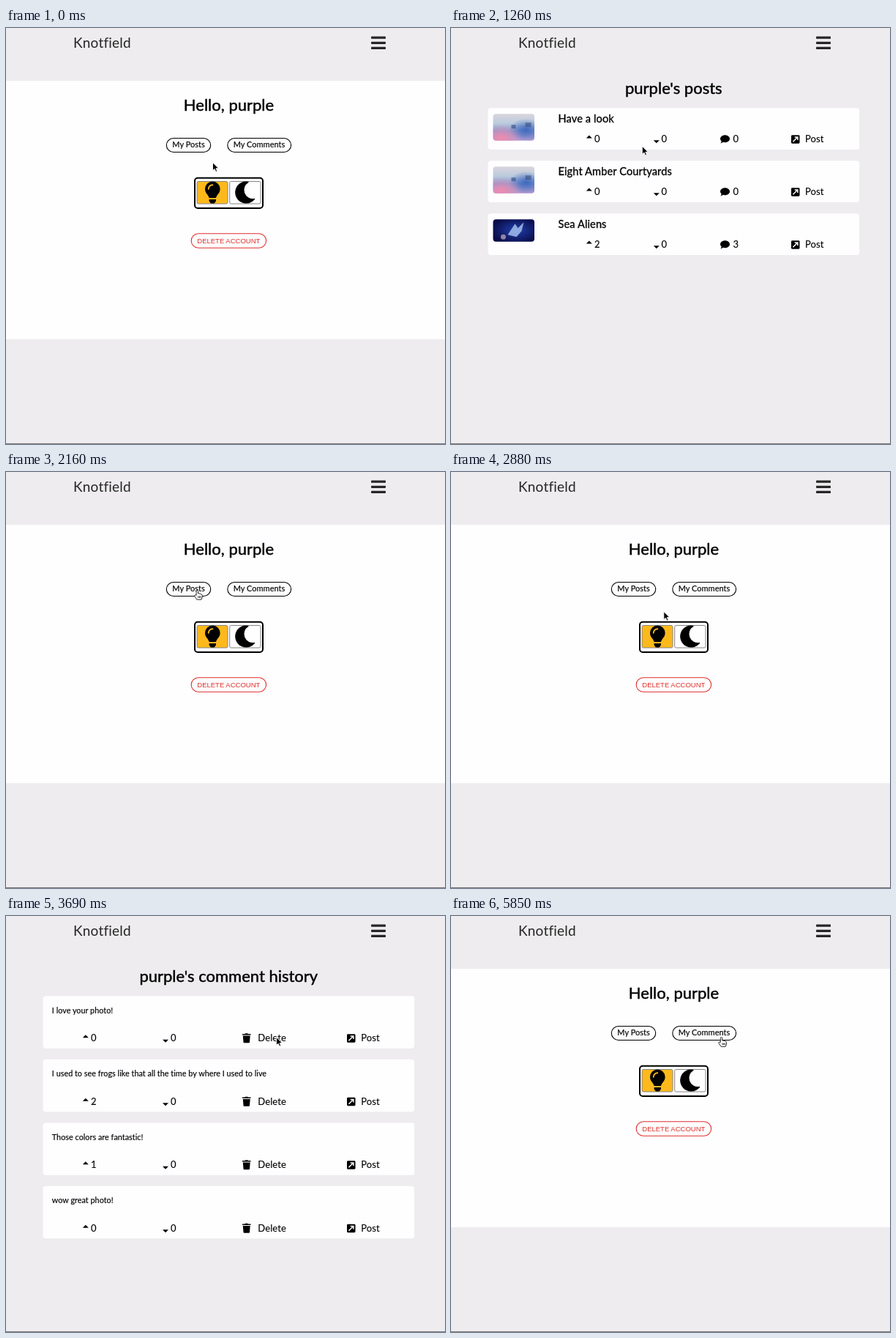
Animation, 600 px wide and 568 px high, one loop 5.94 s. Source, as an HTML page:

```html
<!DOCTYPE html>
<html lang="en">
<head>
<meta charset="utf-8">
<title>Account pages</title>
<style>
  html, body { margin: 0; width: 100%; height: 100%; overflow: hidden; background: #eeecee; }
  svg { display: block; width: 600px; height: 568px; }
  text { font-family: Lato, "Open Sans", sans-serif; white-space: pre; }
  .logo { font-size: 19px; letter-spacing: .2px; fill: #262626; }
  .title { font-size: 22px; text-anchor: middle; stroke: #000; stroke-width: .45px; }
  .button { font-size: 11px; text-anchor: middle; stroke: #000; stroke-width: .15px; }
  .danger { font: 9.5px "Liberation Sans", Arial, sans-serif; text-anchor: middle; fill: #e0302c; }
  .head { font-size: 14.6px; letter-spacing: .1px; stroke: #000; stroke-width: .3px; }
  .note { font-size: 10.8px; letter-spacing: .03px; stroke: #000; stroke-width: .15px; }
  .stat { font-size: 13px; letter-spacing: .1px; stroke: #000; stroke-width: .1px; }
  .card { fill: #fefdff; }
</style>
</head>
<body>
<svg viewBox="0 0 600 568">
  <defs>
    <linearGradient id="mist" x2="0" y2="1">
      <stop offset="0" stop-color="#d9d5dc"/><stop offset=".35" stop-color="#bccbdd"/>
      <stop offset=".65" stop-color="#8598cf"/><stop offset="1" stop-color="#b59bd0"/>
    </linearGradient>
    <radialGradient id="pink" cx=".2" cy=".9" r=".5">
      <stop offset="0" stop-color="#f08aae"/><stop offset="1" stop-color="#f08aae" stop-opacity="0"/>
    </radialGradient>
    <radialGradient id="blue" cx=".8" cy=".6" r=".42">
      <stop offset="0" stop-color="#3e68bd"/><stop offset="1" stop-color="#3e68bd" stop-opacity="0"/>
    </radialGradient>
    <radialGradient id="deep" cx=".55" cy=".5" r=".6">
      <stop offset="0" stop-color="#203fae"/><stop offset="1" stop-color="#0a0c48"/>
    </radialGradient>
    <path id="up" d="M0 4 4 0 8 4Z"/>
    <path id="down" d="M0 0H8L4 4Z"/>
    <path id="bubble" d="M6.5 0C10 0 13 2.2 13 5S10 10 6.5 10Q5 10 3.8 9.6 2.5 11 .3 11.2 1.4 10 1.6 8.2 0 7 0 5C0 2.2 3 0 6.5 0Z"/>
    <g id="open">
      <rect width="11.5" height="11.5" rx="1.4"/>
      <path d="M2.4 9.1 7.7 3.8M4.7 2.7H8.8V6.8" fill="none" stroke="#fefdff" stroke-width="1.5"/>
    </g>
    <path id="trash" d="M0 .9H3.5L4.2 0H7.3L8 .9H11.5V2.4H0ZM.8 3.3H10.7L10 12Q9.9 13 9 13H2.5Q1.6 13 1.5 12Z"/>
    <g id="mistPhoto">
      <rect width="56.5" height="36.5" rx="4" fill="url(#mist)"/>
      <rect width="56.5" height="36.5" rx="4" fill="url(#blue)"/>
      <rect width="56.5" height="36.5" rx="4" fill="url(#pink)"/>
      <path d="M25 15h6v5h-6ZM44 12h8v6h-8Z" fill="#3b5384" opacity=".65"/>
    </g>
    <g id="seaPhoto">
      <rect width="56.5" height="30.5" rx="4" fill="url(#deep)"/>
      <path d="M20 21 30 6 34 12 42 4 39 16 32 24Z" fill="#a3bdec" opacity=".85"/>
      <circle cx="14" cy="24" r="3.5" fill="#8d86a8"/>
    </g>
    <rect id="bar" x="499" width="20" height="3.2" rx=".8" fill="#262626"/>
  </defs>

  <g id="profile">
    <rect class="card" y="72" width="600" height="353"/>
    <text class="title" x="304.5" y="113">Hello, purple</text>
    <g fill="none" stroke="#000" stroke-width="1.1">
      <rect x="219.3" y="150.5" width="60.4" height="19" rx="9.5"/>
      <rect x="302.8" y="150.5" width="86.8" height="19" rx="9.5"/>
      <rect x="253.2" y="280.8" width="102.4" height="19.5" rx="9.75" stroke="#e0302c"/>
      <rect x="258" y="204.7" width="93" height="41.3" rx="4" stroke-width="2"/>
    </g>
    <text class="button" x="249.5" y="163.3">My Posts</text>
    <text class="button" x="346" y="163.3">My Comments</text>
    <text class="danger" x="304.3" y="294.2">DELETE ACCOUNT</text>
    <g stroke="#858585">
      <rect x="261" y="209.5" width="42" height="30.5" rx="2" fill="#fdb91c"/>
      <rect x="305.7" y="209.5" width="42.3" height="30.5" rx="2" fill="#fefdff"/>
    </g>
    <g transform="translate(272 209.5)">
      <path d="M0 10.3A10.3 10.3 0 0 1 20.6 10.3C20.6 16.5 16.3 17.5 15 22.5H5.6C4.3 17.5 0 16.5 0 10.3ZM5.6 24.4H15V26.8L13.5 29.1Q13 30 12 30H8.6Q7.6 30 7.1 29.1L5.6 26.8Z"/>
      <path d="M4.7 10.3A5.6 5.6 0 0 1 10.3 4.7" fill="none" stroke="#fdb91c" stroke-width="1.9" stroke-linecap="round"/>
    </g>
    <path d="M328.4 239.5A15 15 0 1 1 331.1 209.8Q332 210.3 331.3 211A11.8 11.8 0 0 0 339.4 232.8Q340.7 233 340 234A15 15 0 0 1 328.4 239.5Z"/>
  </g>

  <g id="posts"><text class="title" x="304.3" y="90">purple's posts</text><g id="postList"></g></g>
  <g id="comments"><text class="title" x="304.3" y="90">purple's comment history</text><g id="commentList"></g></g>

  <text class="logo" x="92" y="26.5">Knotfield</text>
  <use href="#bar" y="11.6"/><use href="#bar" y="18.7"/><use href="#bar" y="25.8"/>
  <path d="M0 567.5H600" stroke="#77767a"/>

  <g id="cursor">
    <path id="arrow" d="M0 0V11L2.6 8.7 4.3 12.6 6.2 11.8 4.5 8H8Z" stroke="#fff" stroke-width=".9"/>
    <path id="hand" d="M-1.2 7V1.2Q-1.2 0 0 0T1.2 1.2V4.5Q2.8 3.8 3.4 5 4.9 4.5 5.3 5.7 7 5.5 7 7V9.5L5.7 12.8H-.3L-3.6 8.2Q-4 6.6-2.6 6.5ZM1.5 8v2.5M3.2 8v2.5M4.9 8v2.5" fill="#fff" stroke="#111" stroke-width=".9" stroke-linejoin="round"/>
  </g>
</svg>
<script>
const LOOP = 5940, STEP = 90;
const $ = id => document.getElementById(id);
const show = (id, on) => $(id).style.display = on ? '' : 'none';
const icon = (id, x, y) => `<use href="#${id}" x="${x}" y="${y}"/>`;
const label = (cls, x, y, s) => `<text class="${cls}" x="${x}" y="${y}">${s}</text>`;
const card = (y, h) => `<rect class="card" x="50.5" y="${y}" width="507.7" height="${h}" rx="4"/>`;

$('postList').innerHTML = [
  ['Have a look', 0, 0, 'mistPhoto'],
  ['Eight Amber Courtyards', 0, 0, 'mistPhoto'],
  ['Sea Aliens', 2, 3, 'seaPhoto']
].map(([name, ups, replies, photo], i) => {
  const y = 109.2 + i * 72, base = y + 46.5;
  return card(y, 56.7) + label('head', 146.5, y + 20, name) +
    `<g class="photo">${icon(photo, 57.5, y + 8)}</g>` +
    icon('up', 184.8, y + 37.3) + label('stat', 196, base, ups) +
    icon('down', 276.8, y + 44) + label('stat', 287.5, base, 0) +
    icon('bubble', 368, y + 37) + label('stat', 385.5, base, replies) +
    icon('open', 465, y + 37) + label('stat', 484, base, 'Post');
}).join('');

$('commentList').innerHTML = [
  ['I love your photo!', 0],
  ['I used to see frogs like that all the time by where I used to live', 2],
  ['Those colors are fantastic!', 1],
  ['wow great photo!', 0]
].map(([note, ups], i) => {
  const y = 109.2 + i * 86.5, base = y + 62;
  return card(y, 71.5) + label('note', 62.8, y + 23.3, note) +
    icon('up', 104.8, y + 53) + label('stat', 116, base, ups) +
    icon('down', 214, y + 59.5) + label('stat', 225, base, 0) +
    icon('trash', 323, y + 51) + label('stat', 344.3, base, 'Delete') +
    icon('open', 466, y + 52) + label('stat', 485.3, base, 'Post');
}).join('');

const photos = document.querySelectorAll('.photo');
const clamp = v => Math.max(0, Math.min(1, v));
const bend = (a, b, c, s) => a * (1 - s) ** 2 + 2 * b * s * (1 - s) + c * s * s;

// The pointer dips below the buttons on both trips.
function pointer(t) {
  if (t < 2700) {
    const s = clamp(t / 630);
    return [bend(282.5, 278, 261.3, s), bend(183.7, 222, 161.4, s)];
  }
  const s = clamp((t - 2700) / 630);
  return [bend(261.3, 312, 369.5, s), bend(161.4, 232, 165.5, s)];
}

function draw(now) {
  const t = Math.floor(now % LOOP / STEP) * STEP;
  const posts = t >= 720 && t < 1980, comments = t >= 3600 && t < 5310;
  show('posts', posts);
  show('comments', comments);
  show('profile', !posts && !comments);
  show('postList', t >= 990);
  show('commentList', t >= 3690);
  photos.forEach(p => p.style.opacity = t >= 1080 ? 1 : 0);

  const [x, y] = pointer(t);
  const arrow = t >= 810 && t < 2070 || t >= 3510 && t < 3780 || y > 170;
  $('cursor').setAttribute('transform', `translate(${x} ${y})`);
  show('arrow', arrow);
  show('hand', !arrow);
  requestAnimationFrame(draw);
}
draw(performance.now());
</script>
</body>
</html>
```
